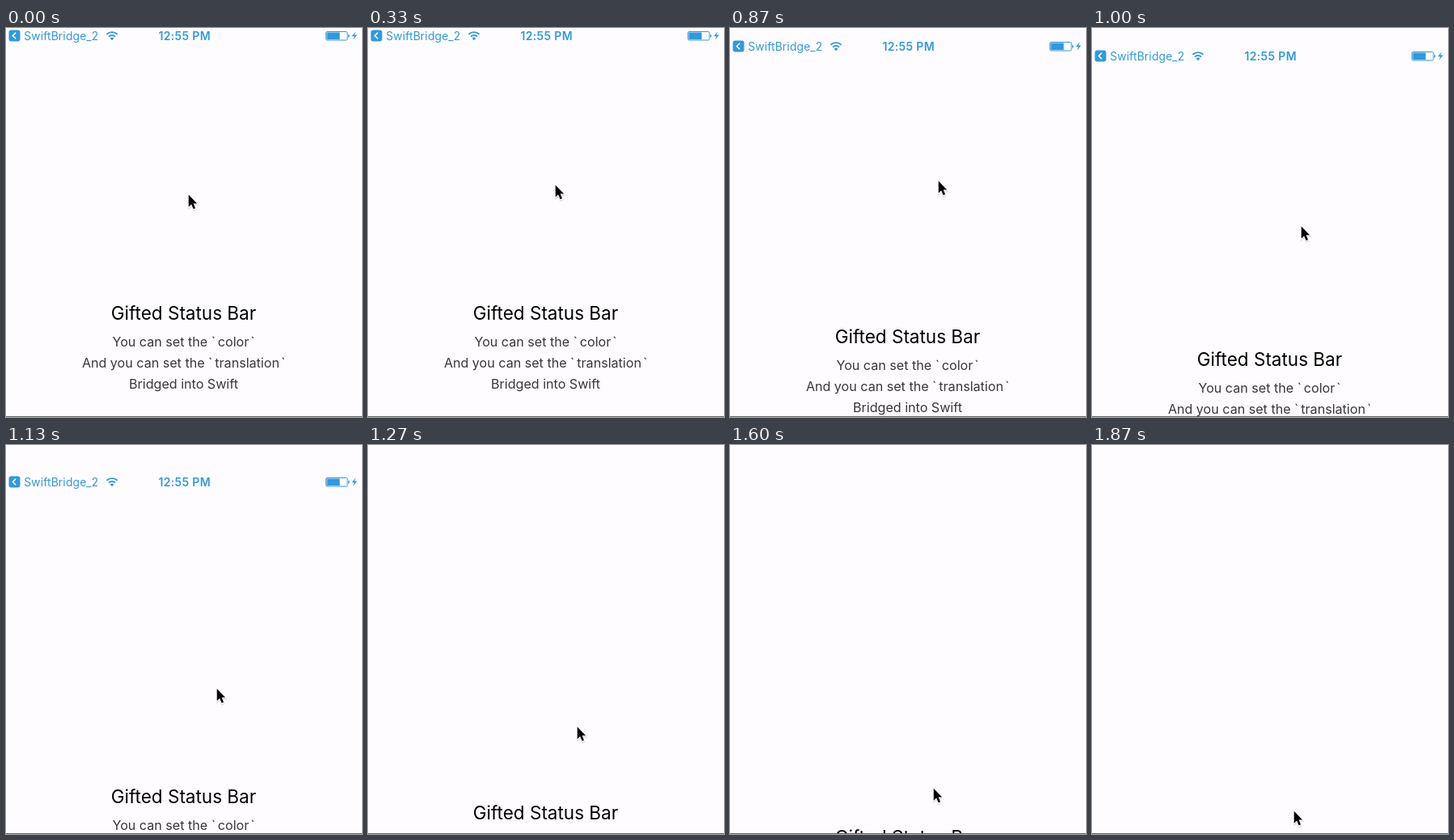
An HTML page that plays this animation: 440 px wide and 480 px high, repeating every 1940 ms.

```html
<!DOCTYPE html>
<html lang="en">
<head>
<meta charset="utf-8">
<title>Gifted Status Bar</title>
<style>
  html, body { margin: 0; width: 100%; height: 100%; overflow: hidden; background: #fefcff; }
  svg { display: block; width: 440px; height: 480px; font-family: Inter, "Liberation Sans", sans-serif; }
  #status { fill: #3498db; font-size: 13.8px; letter-spacing: .17px; }
  #status .time { font-size: 14px; font-weight: 600; letter-spacing: .35px; }
  .line { fill: none; stroke: #3498db; }
  #content { fill: #383838; font-size: 16.1px; text-anchor: middle; }
  #content .title { fill: #000; font-size: 22.5px; }
  .tick { letter-spacing: 3px; }
</style>
</head>
<body>
<svg viewBox="0 0 440 480">
  <defs>
    <path id="arrow" d="M0 0V15L3.4 11.8 5.9 17.6 8.3 16.6 5.9 10.8H10.4Z"/>
  </defs>
  <g id="status">
    <rect x="3.5" y="2.5" width="14" height="14" rx="3"/>
    <path d="M12.1 5.7 8.4 9.5l3.7 3.8" fill="none" stroke="#fff" stroke-width="1.6"/>
    <text x="22.2" y="14.5">SwiftBridge_2</text>
    <g class="line" stroke-width="1.9">
      <path d="M124.4 7.8a9.4 9.4 0 0 1 13.2 0"/>
      <path d="M127 10.6a5.7 5.7 0 0 1 8 0"/>
    </g>
    <path d="M131 15.2l-2.4-2.5a3.4 3.4 0 0 1 4.8 0z"/>
    <text class="time" x="188.4" y="14.5">12:55 PM</text>
    <rect class="line" x="395.5" y="4.5" width="26.5" height="10.5" rx="1.5"/>
    <rect x="396.5" y="5.5" width="16" height="8.5"/>
    <path d="M423 7.8q1.6.3 1.6 2t-1.6 2z"/>
    <path d="M432.3 4.3 427.3 10.2h3.2l-1.7 4.6 5.2-6.2h-3.3z"/>
  </g>
  <g id="content">
    <text class="title" x="219.5" y="360">Gifted Status Bar</text>
    <text x="219.5" y="393">You can set the <tspan class="tick">`</tspan>color<tspan dx="2">`</tspan></text>
    <text x="219.5" y="419">And you can set the <tspan class="tick">`</tspan>translation<tspan dx="2">`</tspan></text>
    <text x="219.5" y="445">Bridged into Swift</text>
  </g>
  <rect y="479" width="440" height="1" fill="#666"/>
  <g id="pointer">
    <use href="#arrow" x="1" y="2.5" stroke="#000" stroke-width="2" opacity=".1"/>
    <use href="#arrow" x=".7" y=".7" stroke="#fff" stroke-width="1.6" paint-order="stroke"/>
  </g>
</svg>
<script>
  const LOOP = 1940, DRAG_START = 670, HIDE_AT = 1270;
  const GRAB_Y = 133, VIEW_H = 783, STATUS_RATIO = .433;

  // Pointer key points: a short dip, a flick up, then the long pull down
  const path = [
    { t: 0, x: 225, y: 205 }, { t: 130, x: 225, y: 226 },
    { t: 270, x: 225, y: 226 }, { t: 330, x: 231, y: 193 }, { t: 530, x: 255, y: 111 },
    { t: 600, x: 255, y: 111 }, { t: 730, x: 255, y: 160 }, { t: 870, x: 256.5, y: 188 },
    { t: 1130, x: 260, y: 300 }, { t: 1400, x: 255.5, y: 391 },
    { t: 1670, x: 250, y: 434 }, { t: 1870, x: 249, y: 451 }
  ];

  const [status, content, pointer] =
    ["status", "content", "pointer"].map(id => document.getElementById(id));

  function pointAt(t) {
    const i = Math.max(1, path.findIndex(p => p.t >= t));
    const a = path[i - 1], b = path[i];
    const k = (t - a.t) / (b.t - a.t);
    return { x: a.x + (b.x - a.x) * k, y: a.y + (b.y - a.y) * k };
  }

  // Elastic overscroll: the pull weakens with distance
  function rubber(d) {
    const pull = Math.max(0, d) * .55;
    return pull / (1 + pull / VIEW_H);
  }

  // The picture steps 15 times a second, rounded to 10 ms
  function stepTime(ms) {
    const start = n => Math.round(n * 20 / 3) * 10;
    const n = Math.floor(ms * 15 / 1000);
    return start(n + 1) <= ms ? start(n + 1) : start(n) <= ms ? start(n) : start(n - 1);
  }

  const move = (el, x, y) =>
    el.setAttribute("transform", `translate(${Math.round(x)} ${Math.round(y)})`);

  function draw(ms) {
    const t = stepTime(ms);
    const { x, y } = pointAt(t);
    const pull = t < DRAG_START ? 0 : rubber(y - GRAB_Y);
    move(pointer, x, y);
    move(content, 0, pull);
    move(status, 0, pull * STATUS_RATIO);
    status.style.visibility = t < HIDE_AT ? "visible" : "hidden";
  }

  const begin = performance.now();
  function tick() {
    draw((performance.now() - begin) % LOOP);
    requestAnimationFrame(tick);
  }
  draw(0);
  requestAnimationFrame(tick);
</script>
</body>
</html>
```
